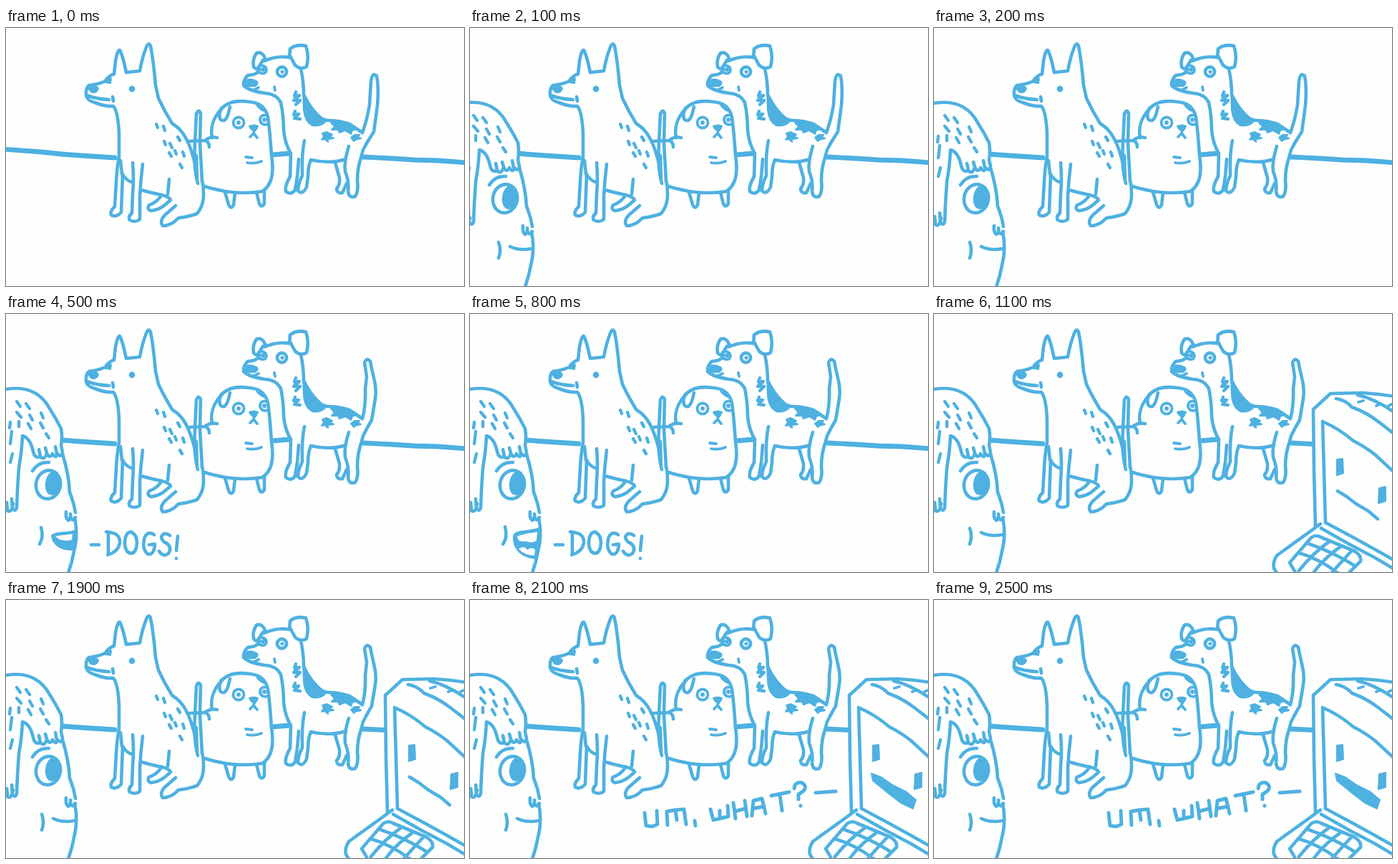
Animation of 640x360 px, one loop 2.8 s. Source, as an HTML page:

```html
<!DOCTYPE html>
<html lang="en">
<head>
<meta charset="utf-8">
<title>Dogs</title>
<style>
html, body { margin: 0; width: 100%; height: 100%; overflow: hidden; background: #fefefe; }
svg { display: block; width: 100%; height: 100%; fill: none; stroke: #4eb1e1; stroke-width: 4.6; stroke-linecap: round; stroke-linejoin: round; }
.ink { fill: #4eb1e1; stroke-width: 2; }
.paper { fill: #fefefe; stroke: none; }
.thin { stroke-width: 3.8; }
.dots { stroke-width: 4.4; }
</style>
</head>
<body>
<svg viewBox="0 0 640 360">
  <path id="horizon" stroke-width="6.8" d="M-4 169L50 173 78 176 105 178 152 181M372 177L396 175M500 180L540 182 570 184 605 185 644 188"/>

  <g id="shepherd">
    <path d="M151 64L153 46Q156 30 159 31Q163 38 168 62L187 60Q190 42 196 27Q199 19 202 25Q206 45 209 80L213 98Q222 117 232 133Q246 142 252 155Q260 170 265 194"/>
    <path d="M151 64Q143 67 139 74Q128 79 116 80Q111 84 112 94Q113 101 124 104Q139 110 150 109Q157 117 158 150L158 180Q155 195 154 215L152 249Q145 256 147 261Q154 265 161 257L163 204Q168 213 176 215"/>
    <path d="M113 94Q126 99 144 100M149 96L150 102M160 185L162 204"/>
    <path d="M177 188Q179 210 177 232L176 258Q170 264 173 268Q181 272 187 267L187 235Q188 213 191 190M189 226Q203 230 213 232Q222 233 229 238M228 211L226 232"/>
    <path d="M217 234Q210 244 200 247Q196 253 203 255Q215 253 222 247L230 240M237 248L222 261Q214 270 219 276Q231 276 241 265Q257 263 267 259Q277 247 276 230Q276 220 274 212"/>
    <path d="M268 217Q262 195 264 160L266 120Q269 112 272 119L271 160 274 214M266 178L267 213"/>
    <path class="ink" d="M115 82Q125 79 129 84Q128 90 121 90Q116 88 115 82ZM139 71Q143 67 147 71L146 77 139 76Z"/>
    <circle class="ink" cx="176" cy="85" r="3.4"/>
    <path class="dots" d="M210 134L212 139M220 137L222 143M221 158L223 163M229 161L232 167M240 152L243 157M228 174L231 179M236 171L238 176M247 173L249 179M243 190L246 195"/>
  </g>

  <g id="pug">
    <path d="M288 153C285 138 291 124 300 114C310 101 326 101 340 103C356 104 363 112 366 124Q369 147 371 178C375 203 371 220 358 228Q332 232 307 228Q290 225 278 221"/>
    <path d="M301 112Q296 122 300 128Q307 133 311 118L313 110M352 108Q357 114 362 115M295 153Q285 151 278 157L256 158M280 158Q284 160 284 166"/>
    <path d="M306 229L311 246Q314 254 318 247L320 230M350 229L354 245Q357 252 361 245L361 227"/>
    <circle class="thin" cx="325" cy="132" r="7.5"/>
    <circle class="ink" cx="325" cy="132" r="2"/>
    <path class="thin" d="M365 122Q355 120 355 129Q357 137 367 134"/>
    <circle class="ink" cx="361" cy="128" r="2"/>
    <path class="ink" d="M340 137Q346 134 352 137Q350 143 347 144Q342 142 340 137Z"/>
    <path class="thin" d="M347 143L346 147 341 152M346 147L351 153M335 180L344 181M337 188Q347 190 357 186"/>
  </g>

  <g id="spotted">
    <path d="M363 45Q359 32 350 35Q344 44 346 54Q350 60 354 53L359 45M361 46Q378 38 396 41L397 29Q406 22 419 25Q424 39 420 54Q412 59 404 52L397 39M412 57Q416 75 416 93Q424 110 435 121Q442 129 451 129Q466 129 480 134L498 146"/>
    <path d="M354 57Q353 65 338 66Q331 73 332 80Q340 88 362 91Q378 92 384 104Q388 123 388 143Q390 162 398 175L397 207Q389 221 391 228Q398 234 404 226L407 207 409 183"/>
    <path d="M417 157Q413 175 414 206Q408 218 408 227Q414 234 420 222L422 207Q422 193 426 184M426 184Q453 190 475 183M460 188L466 209Q467 219 462 224Q462 231 470 230L476 217M479 165Q472 187 474 200Q480 215 478 228Q479 238 488 235Q493 227 491 213Q491 193 497 179"/>
    <circle cx="385.5" cy="61" r="6.6"/>
    <circle class="ink" cx="386" cy="61" r="1.6"/>
    <path class="thin" d="M356 52Q364 53 364 59Q362 66 354 62M375 82L376 87M345 87L353 83"/>
    <circle class="ink" cx="359" cy="58" r="2"/>
    <path class="ink" d="M333 74Q341 69 350 74Q354 78 348 81Q337 82 333 79ZM415 90Q425 113 447 130Q440 138 428 136Q418 131 416 115ZM454 132Q475 127 489 141L484 143 482 148 474 143 466 146 464 142 455 142 459 137ZM442 147L448 145 456 149 452 151 458 154 450 155 450 159 445 155 441 156 444 151ZM482 153L487 149 494 149 492 152 496 154 488 156 486 158Z"/>
    <path class="dots" d="M405 89L403 95 410 94 402 101 411 101 405 107M404 116L402 121 409 120 403 126 411 127"/>
    <path id="tailRight" d="M498 146Q505 127 508 107L510 74Q512 61 518 67Q521 82 519 108L514 145Q505 158 499 170L496 181"/>
    <path id="tailLeft" d="M498 146Q503 127 502 105L504 87 501 68Q504 60 509 66Q511 77 514 89Q518 104 516 118L511 148Q505 158 499 170L496 181"/>
  </g>

  <g id="person">
    <path class="paper" d="M-20 106L18 104Q48 108 62 134L77 163 79 198Q89 228 91 264L98 300Q96 335 86 365L-20 365Z"/>
    <path d="M-20 107L0 105Q24 101 40 110Q53 117 61 132Q70 146 77 160Q79 172 77 184L79 193Q77 201 72 195Q70 203 65 195Q61 203 57 194Q54 205 48 199Q40 202 38 192Q34 173 23 170Q22 193 18 214L16 245 15 270Q13 277 9 271L8 258M10 265Q7 279 2 274L1 263M1 269L-6 276M71 195L69 185M57 194L55 187M48 199L46 189"/>
    <path d="M79 195Q88 225 89 249Q95 263 97 277M84 276Q83 285 87 288Q91 286 90 279M90 283Q93 291 97 284M96 284Q101 309 95 331Q92 348 86 364M37 219Q45 206 60 207"/>
    <ellipse cx="59" cy="238" rx="17" ry="20" transform="rotate(12 59 238)"/>
    <ellipse class="ink" cx="65.5" cy="236" rx="9.5" ry="16" transform="rotate(10 65.5 236)"/>
    <path class="dots" d="M15 122L20 129M28 125L33 132M15 137L21 144M33 141L37 148M49 138L52 145M48 152L52 159M6 151L5 159M18 150L18 157M31 153L35 160M8 164L6 181M9 195L6 207M56 167L60 173"/>
    <path id="mouthClosed" d="M50 299Q54 310 50 321M66 305Q79 311 95 308"/>
    <g id="mouthHalf">
      <path d="M49 298Q53 311 47 321"/>
      <path class="ink" d="M64 309C70 303 84 307 97 302L95 329C79 330 65 323 64 309Z"/>
      <path class="paper" d="M69 310Q82 308 93 307L92 315Q77 319 69 310Z"/>
    </g>
    <g id="mouthOpen">
      <path d="M49 297Q53 312 46 321"/>
      <path class="ink" d="M61 311C61 301 79 305 97 299L93 341C76 340 60 331 61 311Z"/>
      <path class="paper" d="M66 310Q78 306 94 304L93 316Q87 321 78 317Q66 319 66 310ZM68 328Q75 322 80 329Q87 324 91 329L90 337Q77 337 68 328Z"/>
    </g>
  </g>

  <path id="dogsCall" role="img" aria-label="-DOGS!" d="M119 322L130 322M143 304L143 336M140 304Q160 305 159 319Q157 332 142 336M174 304Q183 307 183 320Q182 334 174 334Q166 332 166 318Q167 305 174 304M207 308Q199 302 194 311Q189 327 198 335Q207 337 208 321L200 322M229 309Q221 303 217 311Q218 318 225 320Q233 328 226 335Q219 339 214 331M240 310L238 330M238 341L238 341.2"/>

  <g id="laptop">
    <path class="paper" d="M530 132L555 111 600 110 680 118 680 370 482 370 475 352 479 337 533 297Z"/>
    <path d="M533 297L531 220 530 133Q540 124 554 111L598 110 622 112 680 120M543 150L545 220 547 291M543 150Q566 160 586 177Q602 185 616 196L640 218 660 234M562 118Q575 120 584 130Q604 137 622 151L640 165 660 180M592 113Q619 119 650 142"/>
    <path class="thin" d="M593 123L600 121M618 128L623 126M635 128L644 124"/>
    <path d="M533 297L540 293 479 337Q473 347 475 355L482 366M547 291L590 314 617 329 660 353M541 299L580 321 616 340 655 363"/>
    <path d="M497 347L527 312Q534 307 542 312L588 331Q598 338 596 345L577 364M497 347L507 364M509 333Q540 342 568 364M522 320Q560 333 589 352M553 317Q530 333 510 358M569 324Q545 340 528 364M583 331L553 364"/>
    <path class="ink" d="M563 203L571 202 572 222 563 225ZM622 243L631 241 631 261 621 264Z"/>
    <path id="lineMouth" d="M564 247L577 255 590 265 607 275 620 286"/>
    <path id="wideMouth" class="ink" d="M561 242L577 249 590 259 610 269 624 281 621 298 604 293 585 281 565 265Z"/>
    <path id="flatMouth" class="ink" d="M561 242L576 248 590 258 610 268 623 279 619 291 602 283 585 270 563 252Z"/>
  </g>

  <path id="reply" role="img" aria-label="Um, WHAT? —" stroke-width="5" d="M244 297L246 315 255 316 262 313 261 294M276 314L275 295 287 293 289 307M287 293L299 292 302 313M314 308L315 315M336 292L340 307 349 305 349 294M349 305L361 302 360 287M368 283L371 305M384 280L387 302M370 295L385 291M394 301L396 280 408 277 413 298M396 291L411 288M421 273L446 268M433 272L436 294M453 263Q454 253 464 255Q473 261 464 268L459 271 459 278M462 287L462 287.2M483 269L511 267"/>
</svg>
<script>
const LOOP = 2800;
const part = id => document.getElementById(id);

// Intervals in which each part is visible, in ms.
const visible = {
  person: [[100, LOOP]],
  mouthClosed: [[0, 500], [1000, LOOP]],
  mouthHalf: [[500, 600], [700, 800]],
  mouthOpen: [[600, 700], [800, 1000]],
  dogsCall: [[500, 1000]],
  tailRight: [[0, 500], [600, 700]],
  tailLeft: [[500, 600], [700, LOOP]],
  laptop: [[1000, LOOP]],
  lineMouth: [[0, 2100]],
  wideMouth: [[2200, 2500]],
  flatMouth: [[2100, 2200], [2500, LOOP]],
  reply: [[2100, LOOP]]
};

// Both visitors slide in with one short step.
const slideX = (id, x) => part(id).setAttribute("transform", `translate(${x} 0)`);

function draw(time) {
  for (const [id, spans] of Object.entries(visible)) {
    const on = spans.some(([from, to]) => time >= from && time < to);
    part(id).style.display = on ? "" : "none";
  }
  slideX("person", time < 200 ? -10 : 0);
  slideX("laptop", time < 1100 ? 10 : 0);
}

const start = performance.now();
function tick() {
  draw((performance.now() - start) % LOOP);
  requestAnimationFrame(tick);
}
tick();
</script>
</body>
</html>
```
